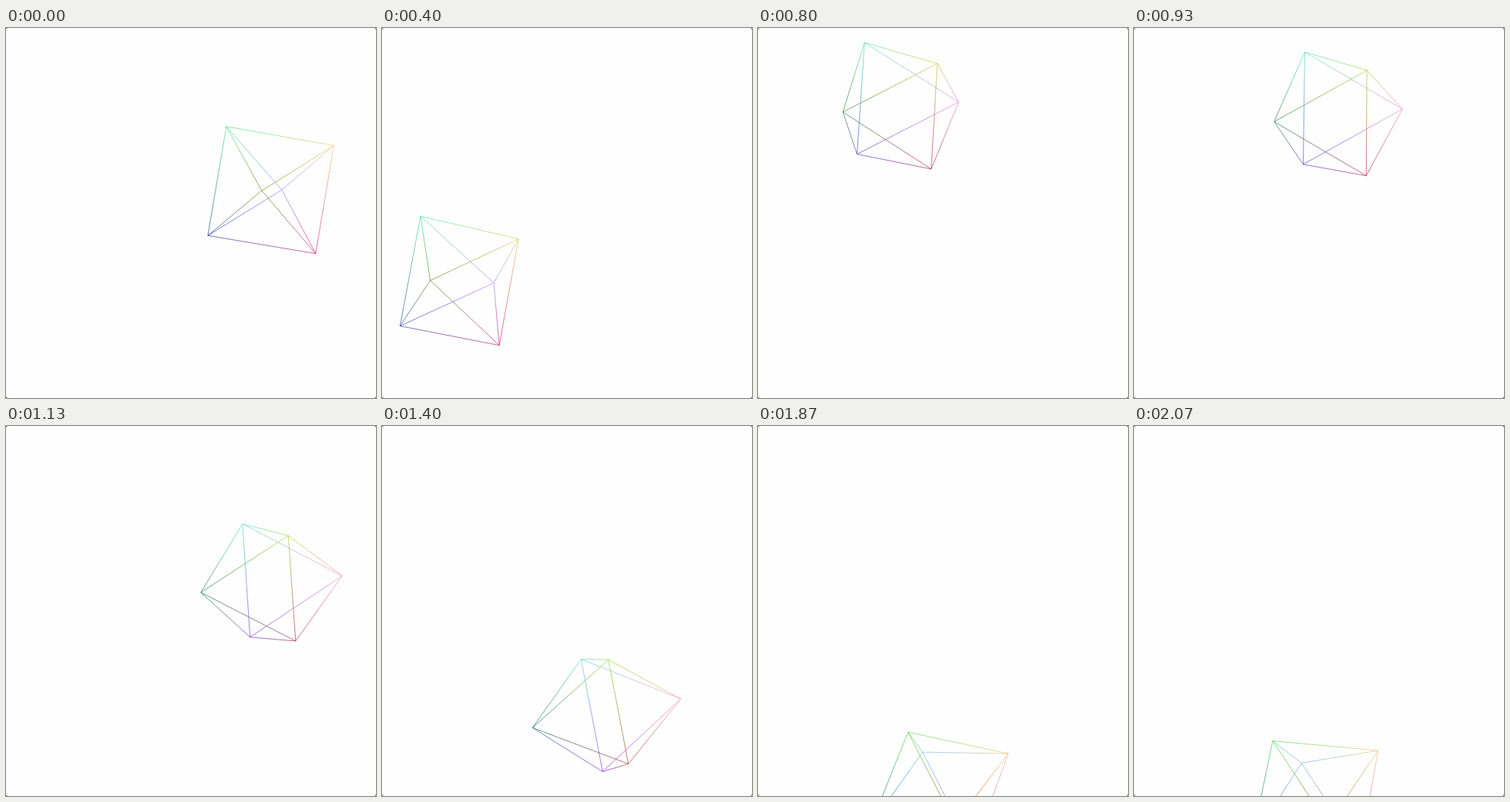
An HTML page with a canvas that plays this animation: 480x480 px, repeating every 2140 ms.

```html
<!DOCTYPE html>
<html lang="en">
<head>
<meta charset="utf-8">
<title>Drifting octahedron</title>
<style>
html, body { margin: 0; width: 100%; height: 100%; overflow: hidden; background: #fefefe; }
canvas { display: block; width: 100vw; height: 100vh; }
</style>
</head>
<body>
<canvas id="stage" width="480" height="480"></canvas>
<script>
const ctx = document.getElementById('stage').getContext('2d');
const LOOP = 2140, STEP = 200 / 3, STEPS = 32;
const RADIUS = 101, DEPTH = 1800, HUB = { x: 207, y: 245 };

// Orbit angle and distance around the hub, then yaw, pitch and roll, in degrees
const poses = [
  { at: 0, angle: -14.1, dist: 141.3, yaw: 7.4, pitch: 0.3, roll: 35.3 },
  { at: 6, angle: 141.4, dist: 134.7, yaw: 24, pitch: -0.9, roll: 34 },
  { at: 8, angle: 197.3, dist: 147.7, yaw: 32, pitch: 0.2, roll: 34.3 },
  { at: 12, angle: 260.2, dist: 144.3, yaw: 48.1, pitch: 3.7, roll: 35.6 },
  { at: 17, angle: 343.7, dist: 141.1, yaw: 65.9, pitch: 6.1, roll: 40.9 },
  { at: 21, angle: 417, dist: 152.6, yaw: 75.7, pitch: 10.7, roll: 46.9 },
  { at: 25, angle: 442.4, dist: 218.1, yaw: 86.7, pitch: 20, roll: 56 },
  { at: 31, angle: 443.1, dist: 235.8, yaw: 97, pitch: 35.3, roll: 61.2 }
];

const rad = deg => deg * Math.PI / 180;
const mix = (a, p, b, q) => a.map((v, i) => v * p + b[i] * q);

// Smooth curve through the poses that never overshoots them
function sample(name, t) {
  const last = poses.length - 1;
  const rate = i => (poses[i + 1][name] - poses[i][name]) / (poses[i + 1].at - poses[i].at);
  const slope = i => {
    if (i === 0) return rate(0);
    if (i === last) return rate(last - 1);
    const a = rate(i - 1), b = rate(i);
    return a * b > 0 ? 2 * a * b / (a + b) : 0;
  };
  let i = 0;
  while (i < last - 1 && t >= poses[i + 1].at) i++;
  const p = poses[i], q = poses[i + 1], h = q.at - p.at;
  const u = (t - p.at) / h, w = 1 - u;
  return p[name] * (1 + 2 * u) * w * w + q[name] * (1 + 2 * w) * u * u
    + h * u * w * (slope(i) * w - slope(i + 1) * u);
}

// The three axes of the solid: y up, z towards the viewer
function axes(yaw, pitch, roll) {
  const sy = Math.sin(yaw), cy = Math.cos(yaw);
  const sp = Math.sin(pitch), cp = Math.cos(pitch);
  const sr = Math.sin(roll), cr = Math.cos(roll);
  const front = [sy * cp, sp, cy * cp];
  const right = [cy, 0, -sy];
  const up = [-sp * sy, cp, -sp * cy];
  return [front, mix(up, cr, right, -sr), mix(up, sr, right, cr)];
}

function corners() {
  ctx.fillStyle = '#777';
  for (const x of [0, 480]) for (const y of [0, 480]) {
    const dx = x ? -2 : 2, dy = y ? -2 : 2;
    ctx.beginPath();
    ctx.moveTo(x, y);
    ctx.lineTo(x + dx, y);
    ctx.lineTo(x, y + dy);
    ctx.fill();
  }
}

function line(p, q) {
  const g = ctx.createLinearGradient(p.x, p.y, q.x, q.y);
  g.addColorStop(0, p.color);
  g.addColorStop(1, q.color);
  ctx.strokeStyle = g;
  ctx.beginPath();
  ctx.moveTo(p.x, p.y);
  ctx.lineTo(q.x, q.y);
  ctx.stroke();
}

function draw(step) {
  ctx.fillStyle = '#fefefe';
  ctx.fillRect(0, 0, 480, 480);
  corners();

  const angle = rad(sample('angle', step)), dist = sample('dist', step);
  const cx = HUB.x + dist * Math.cos(angle);
  const cy = HUB.y + dist * Math.sin(angle);
  const turn = ['yaw', 'pitch', 'roll'].map(name => rad(sample(name, step)));

  // Each vertex takes its colour from its direction
  const points = axes(...turn).flatMap(a => [a, a.map(v => -v)]).map(n => {
    const k = RADIUS / (1 - n[2] * RADIUS / DEPTH);
    return {
      x: cx + n[0] * k,
      y: cy - n[1] * k,
      z: n[2],
      color: `rgb(${n.map(v => Math.round(127.5 + 127.5 * v)).join(',')})`
    };
  });

  // Every pair of vertices is joined except opposite ones
  const edges = [];
  points.forEach((p, i) => {
    for (let j = i + 1; j < 6; j++) {
      if (i >> 1 !== j >> 1) edges.push([p, points[j]]);
    }
  });
  edges.sort((a, b) => a[0].z + a[1].z - b[0].z - b[1].z);
  ctx.lineWidth = 0.65;
  edges.forEach(([p, q]) => line(p, q));
}

const startOf = i => Math.round(i * STEP / 10) * 10;

function tick() {
  const t = performance.now() % LOOP;
  let step = STEPS - 1;
  while (step > 0 && startOf(step) > t) step--;
  draw(step);
  requestAnimationFrame(tick);
}
tick();
</script>
</body>
</html>
```
